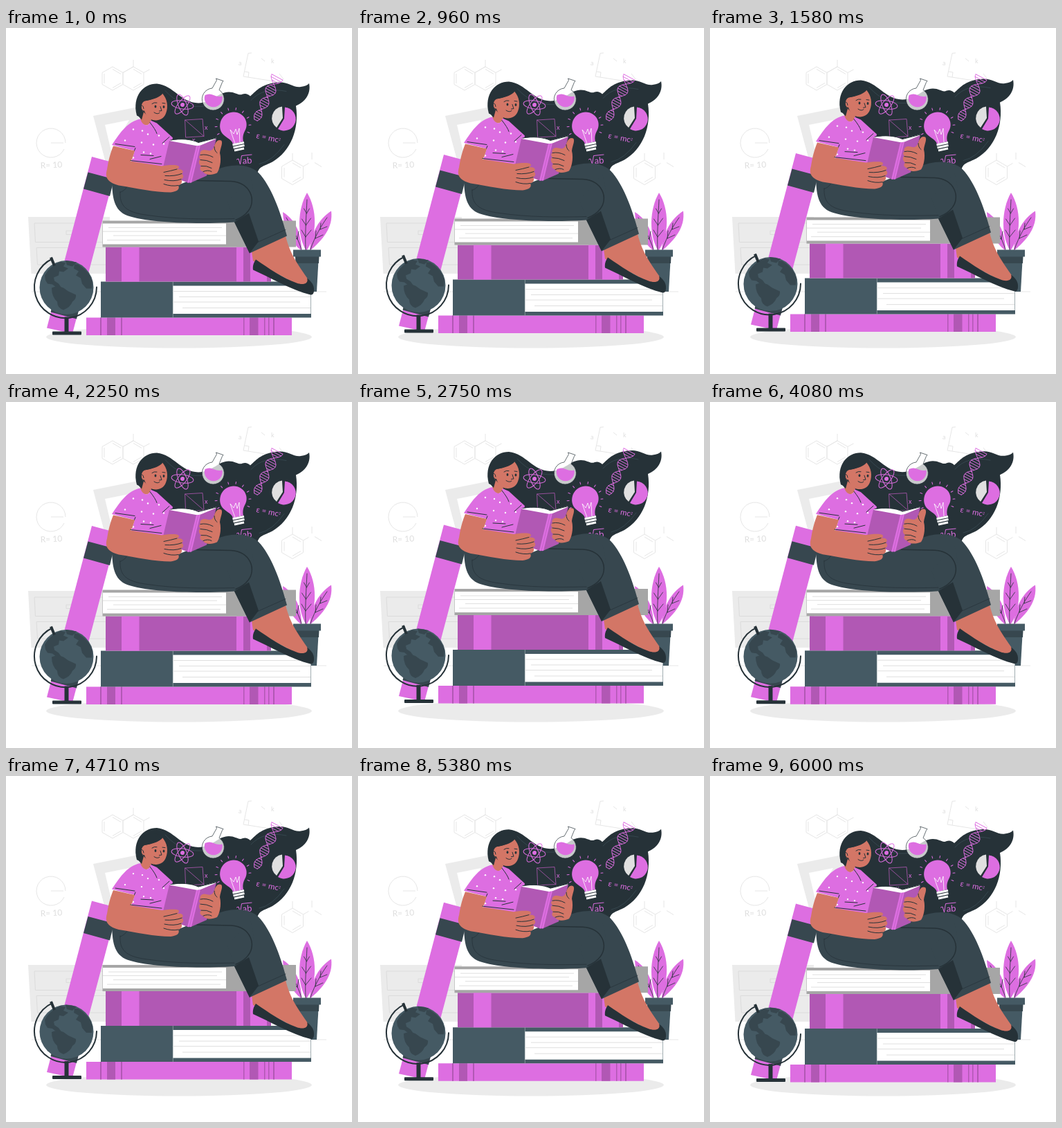
An HTML page for the animation above (6040 ms loop, 500 by 500 pixels).

```html
<!DOCTYPE html>
<html lang="en">
<head>
<meta charset="utf-8">
<title>Reading on a stack of books</title>
<style>
html, body { margin: 0; width: 100%; height: 100%; overflow: hidden; background: #fff; }
svg { display: block; width: 100vw; height: 100vh; }
text { font-family: Lato, sans-serif; }
.pink { fill: #dd6ee1; }
.plum { fill: #b158b4; }
.ink { fill: #263238; }
.navy { fill: #37474f; }
.slate { fill: #455a64; }
.skin { fill: #d37666; }
.grey { fill: #a6a6a6; }
.pale { fill: #ebebeb; }
.white { fill: #fff; }
.line { fill: none; stroke: #263238; stroke-width: 1; stroke-linecap: round; stroke-linejoin: round; }
.faint { fill: none; stroke: #e6e6e6; stroke-width: 1; }
.neon { fill: none; stroke: #dd6ee1; stroke-width: 1; stroke-linecap: round; }
.page { fill: none; stroke: #dcdcdc; stroke-width: .9; }
</style>
</head>
<body>
<svg viewBox="0 0 500 500">
  <!-- backdrop -->
  <ellipse class="pale" cx="250" cy="446.5" rx="192" ry="16"/>
  <path class="pale" d="M32 273H150V355H36.500Z"/>
  <path class="faint" style="stroke:#dcdcdc" d="M150 282H41L42.500 309.500H150M150 317.500H44L45.500 342H150M87 293h10v5.500h-10z"/>
  <path class="faint" d="M37 381H463"/>
  <path class="pale" fill-rule="evenodd" d="M126 127L206 111L149 213ZM143 140L152 178L178 133Z"/>
  <g class="faint">
    <path d="M154 56l15 8.500v17L154 90l-15-8.500v-17zM184 56l15 8.500v17L184 90l-15-8.500v-17zL169 64.500M184 56V46M199 64.500l8.500-4.500M142 66v14M154 86.500l12-7M154 59.500l12 7M184 59.500l12 7M184 86.500l12-7"/>
    <path d="M86 166A21 21 0 1 0 84 175M65 166H83"/>
    <path d="M355 36L350 36.500L343 70L400 79M345 63l6 1-1 7M369 44l5 4M395 66l6 8"/>
    <path d="M414 191l15.500 9v17.500l-15.500 9-15.500-9V200zM414 191V181M429.500 200l8-4.500M442 190V180M446 194.500l10 6M402 202v13.500M414 222.500l12-7M414 195l12 7"/>
  </g>
  <g fill="#dedede" font-size="12">
    <text x="50" y="203" transform="rotate(-3 50 203)">R= 10</text>
    <text x="336" y="54" font-size="9">a</text>
    <text x="383" y="51" font-size="9">k</text>
  </g>

  <!-- plant -->
  <g class="pink">
    <path d="M434 322C420 300 421 262 435 238C450 262 450 300 434 322Z"/>
    <path d="M439 322C440 296 453 275 470 264.500C473 288 458 306 439 322Z"/>
    <path d="M427 322C410 308 401 289 400 266C420 278 427 300 427 322Z"/>
  </g>
  <path class="line" style="stroke-width:.8" d="M433 322C432 296 434 270 435 248M433 302l-6-10M433 302l8-10M433.500 285l-6-9M433.500 285l7-10M434.500 268l-4-7M434.500 268l4-7M440 320C446 302 456 285 464 274M447 304l1-11M447 304l11-5M454 291l1-9M454 291l10-4M427 320C422 304 412 286 405 274M421 305l-9-5M421 305l2-11"/>
  <path class="slate" d="M418 328H452L449 381H421Z"/>
  <path class="navy" d="M418 330H452.500L452 340H419Z"/>
  <path class="slate" d="M415 320.500h40v10h-40z"/>

  <!-- hair -->
  <g class="float">
    <path class="ink" d="M189 126C182 98 198 80 218 80C243 83 252 107 278 108C300 107 306 92 322 92C332 92 336 98 342 95Q348 93 353 98C362 90 370 79 396 78C408 78 416 86 426 84.500C432 84 436 82 438 79.500C441 94 433 106 419 112C424 145 412 177 385 193C374 199 364 199 363 212L330 216L237 172L205 134Z"/>
    <path class="line" style="stroke:#455a64;stroke-width:.5" d="M230 90Q255 118 290 112M354 104Q372 84 405 91M402 168Q385 192 366 196"/>
  </g>

  <!-- study icons -->
  <g transform="rotate(8 255 111)">
    <g id="orbits" class="neon" transform="translate(255 111)"></g>
    <circle class="pink" cx="255" cy="111" r="3"/>
  </g>
  <path class="neon" style="stroke:#b158b4;stroke-width:.8" d="M259 133L284 131.500L286 156.500L260 158ZL286 156.500"/>
  <g class="pink" font-size="9">
    <text x="287" y="147">x</text>
    <text x="269" y="165">x</text>
  </g>
  <path d="M303.500 73L314 76.500L312.500 78.500L308 89.500A16 16 0 1 1 298 87L304.500 75.500Z" fill="#fff" fill-opacity=".74" stroke="#263238" stroke-width=".7"/>
  <path class="pink" d="M287.500 97Q294 94 300 97T312.500 98.500A13 13 0 1 1 287.500 97Z"/>
  <path class="pink" d="M311 150C305 136 315 121.500 329 121.500C345 122 352 138 345 149C342 155 342 160 343 164L328 167.500C326 160 315 158 311 150Z"/>
  <path fill="none" stroke="#fff" stroke-width=".8" d="M331 167L324 147L329 153L332 146L334 154L337 145L338 165"/>
  <path fill="none" stroke="#fff" stroke-width="3" d="M327.500 169L344 165.500M328.500 173L344.500 169.500M330 177L344 174"/>
  <g id="rays" class="neon" transform="translate(328 141)"></g>
  <path id="helix" class="neon"/>
  <path fill="#e0e0e0" d="M400 130L391 144A17 17 0 0 1 399 113.500Z"/>
  <path class="pink" d="M402 131L403 114.500A17 17 0 1 1 393 146Z"/>
  <path class="neon" stroke-width="1.300" d="M333.500 190L336 189L338.500 197L340.500 184.500L355 183"/>
  <g class="pink">
    <text x="361" y="159" font-size="11.500" transform="rotate(11 361 159)">ε = mc<tspan font-size="5" dy="-3">2</tspan></text>
    <text x="342" y="196.500" font-size="13" transform="rotate(-5 342 196)">ab</text>
  </g>

  <g class="float">
    <!-- leaning book -->
    <path class="pink" d="M124 185.500L161 195.500L96 441L59 433Z"/>
    <path class="navy" d="M118.500 208L156 218L150 242.500L112 232Z"/>
    <path class="navy" d="M71 386L108 396L102 420L64.500 410Z"/>

    <!-- globe -->
    <circle class="slate" cx="87.500" cy="374.500" r="39"/>
    <g class="navy">
      <path d="M56 357Q63 344 78 337.500L86 339L83 344L90 347L83 352L77 351L76 357L69 360L70 365L76 369L81 376L76 377L67 370L60 369L57 364Z"/>
      <path d="M66 375Q74 371 83 375L90 380L101 385Q102 391 96 395Q93 403 83 407Q74 404 74 395Q66 388 66 375Z"/>
      <path d="M104 341Q121 351 125 366L124 376L116 376L110 369L108 361L101 357L105 351L98 347L99 341Z"/>
      <path d="M86 335.500L102 338L96 344L88 342Z"/>
    </g>
    <path class="line" style="stroke-width:2" d="M67 333A45 45 0 1 0 131 374"/>
    <path class="line" style="stroke-width:4;stroke-linecap:butt" d="M65 331L70 343"/>
    <path class="ink" d="M84.500 417h6v22h-6z"/>
    <rect class="ink" x="67" y="438" width="42" height="5" rx="1"/>

    <!-- stacked books -->
    <path class="pink" d="M116 418H413V443.500H116Z"/>
    <path class="plum" d="M136 418h2v25.500h-2zM146 418h12v25.500h-12zM166 418h2v25.500h-2zM343 418h1.500v25.500h-1.500zM352 418h12.500v25.500h-12.500zM373 418h1.500v25.500h-1.500zM379 418h1.500v25.500h-1.500zM386 418h2v25.500h-2z"/>
    <path class="slate" d="M137 366H441V418H137Z"/>
    <path class="white" d="M241 372H440.500V412.500H241Z"/>
    <path d="M241.300 366V418" stroke="#a0abb0" stroke-width=".7"/>
    <path class="page" d="M241 380H430M250 388H440M241 395.500H425M255 404H440"/>
    <path class="plum" d="M144 316H383V366H144Z"/>
    <path class="pink" d="M167 316h25.500v50h-25.500zM333 316h10v50h-10zM353 316h24v50h-24z"/>
    <path class="grey" d="M139.500 278H419V316H139.500Z"/>
    <path class="white" d="M140 282H318V312H140Z"/>
    <path class="page" d="M148 288H312M140 293.500H305M155 299.500H318M146 306H310"/>

    <!-- legs -->
    <path class="skin" d="M355 322L404 300C411 329 425 345 436 362C440 370 431 373 421 370L357 336Z"/>
    <path class="ink" d="M361 334C357 340 356.500 344 357 349C382 360 412 378 440 385C445 386 446 379 444.500 373C443 368 440 365 435 361C438 370 428 371 420 368C400 361 380 347 361 334Z"/>
    <path class="navy" d="M153 222C154 248 157 266 180 272C215 282 285 283 330 280L352 325L406 300C398 270 386 234 368 212C355 195 325 194 300 206L250 226Z"/>
    <path class="ink" d="M330 280L351 267L365 308L352 325Z"/>
    <path class="navy" d="M353 214C362 240 358 262 330 278L320 250Z"/>
    <path class="line" style="stroke-width:1.500" d="M276 220L325 221C354 223 362 249 350 264C345 271 339 274 332 277"/>
    <path class="line" style="stroke-width:.7" d="M165 236C164 256 172 266 205 270C245 276 290 276 330 275M165 237Q171 235 175 229M357 312L404 291"/>

    <!-- head -->
    <path class="skin" d="M196 118L194 133C198 143 208 142 210 132Z"/>
    <path class="skin" d="M200 105C211 103 221 99 226 94C233 102 235 113 231 123C227 133 217 135 208 131C203 128 201 122 200 119C195 120 193 108 200 105Z"/>
    <path class="ink" d="M188 112C189 94 204 83 227 91C228 97 215 103 200 105C194 108 195 119 199 121L196 132C190 126 187 120 188 112Z"/>
    <ellipse class="ink" cx="216" cy="113" rx="1.400" ry="2"/>
    <ellipse class="ink" cx="228" cy="113.500" rx="1.400" ry="2"/>
    <path class="line" d="M211 109Q214 106.500 218 107.500M226 108L230 108.500M223 113L225 119L221.500 119.500M214 121.500Q219 125 222 122M196 111Q199 112 199 116"/>

    <!-- blouse -->
    <path class="pink" d="M194 131C176 135 166 149 153 168.500L186 177L180 196L232 204L241 158L218 137L209 133C207 143 198 142 194 131Z"/>
    <g id="dots" class="white"></g>
    <path class="line" d="M158 167L186 171M187 173L180 190M208 136Q216 146 218 152M236 157L226 166M195 183L213 184M208 189L224 185"/>

    <!-- open book -->
    <path class="white" d="M237 162C252 159 268 160 278 165C286 163 296 160 304 158L298 168L278 173L239 168Z"/>
    <path class="line" d="M238 161.500C252 159 268 160 278 165L304 158.500"/>
    <path class="plum" d="M236 162.500L277 170L264 223.500L225 209Z"/>
    <path class="plum" d="M280 169.500L304 159.500L290 213L266 223.500Z"/>
    <path class="pink" d="M275 170L281 169L268 223L262 223Z"/>
    <path class="line" style="stroke:#b158b4;stroke-width:.6" d="M278 170L265 223"/>

    <!-- arms -->
    <path class="skin" d="M155 170L186 177C184 184 182 190 180 192L225 199C231 198 240 197 247 198C251 199 251 202 247 203.500C255 203 258 207 254 210C258 213 256 217 253 218C256 222 253 226 249 227C252 233 246 236 238 237C215 237 188 231 163 227C145 222 143 214 146 204C148 190 151 180 155 170Z"/>
    <path class="line" d="M180 191L225 196M228 208Q238 206 247 203.500M230 213Q244 214 254 210M229 219Q243 222 253 218M228 225Q239 229 249 227"/>
    <path class="skin" d="M281 183C279 178 284 174 290 176C296 178 299 176 301 170C303 163 307 160 311 162C314 165 310 172 309 180C312 192 308 205 305 209C297 213 287 212 285 207C280 206 279 202 282 199C278 196 278 191 281 189C278 187 279 184 281 183Z"/>
    <path class="line" d="M281 183Q290 181 299 186M281 190Q290 190 298 194M282 199Q290 198 297 202M285 207Q292 204 297 207M301 171Q301 177 305 180"/>
  </g>
</svg>
<script>
const LOOP = 6040, TURN = 3230, RISE = 10, TOP = -9.5;
const el = id => document.getElementById(id);
const repeat = (n, f) => Array.from({ length: n }, (_, i) => f(i)).join('');

el('orbits').innerHTML = repeat(3, i => `<ellipse rx="16" ry="6" transform="rotate(${i * 60})"/>`);
el('rays').innerHTML = repeat(10, i => `<path d="M23 0H26" transform="rotate(${150 + i * 26})"/>`);

const spots = [[184, 146], [197, 148], [205, 153], [172, 162], [196, 165], [213, 168], [221, 155], [184, 187], [209, 181], [228, 167], [199, 179]];
el('dots').innerHTML = spots.map(([x, y]) => `<circle cx="${x}" cy="${y}" r="1.200"/>`).join('');

// Two strands and their rungs along a slanted axis, widening upwards.
const strand = (u, side) => {
  const s = side * (5 + 4 * u) * Math.sin(u * Math.PI * 3.4 + .5);
  return `${(361 + 31 * u + .88 * s).toFixed(1)} ${(133 - 62 * u + .47 * s).toFixed(1)}`;
};
const strandPath = side => 'M' + Array.from({ length: 41 }, (_, i) => strand(i / 40, side)).join('L');
el('helix').setAttribute('d', strandPath(1) + strandPath(-1) +
  repeat(20, i => `M${strand(i / 19, 1)}L${strand(i / 19, -1)}`));

const floats = document.querySelectorAll('.float');
function draw() {
  const t = performance.now() % LOOP;
  const y = TOP + RISE * Math.abs(1 - t / TURN);
  floats.forEach(g => g.setAttribute('transform', `translate(0 ${y.toFixed(3)})`));
  requestAnimationFrame(draw);
}
draw();
</script>
</body>
</html>
```
